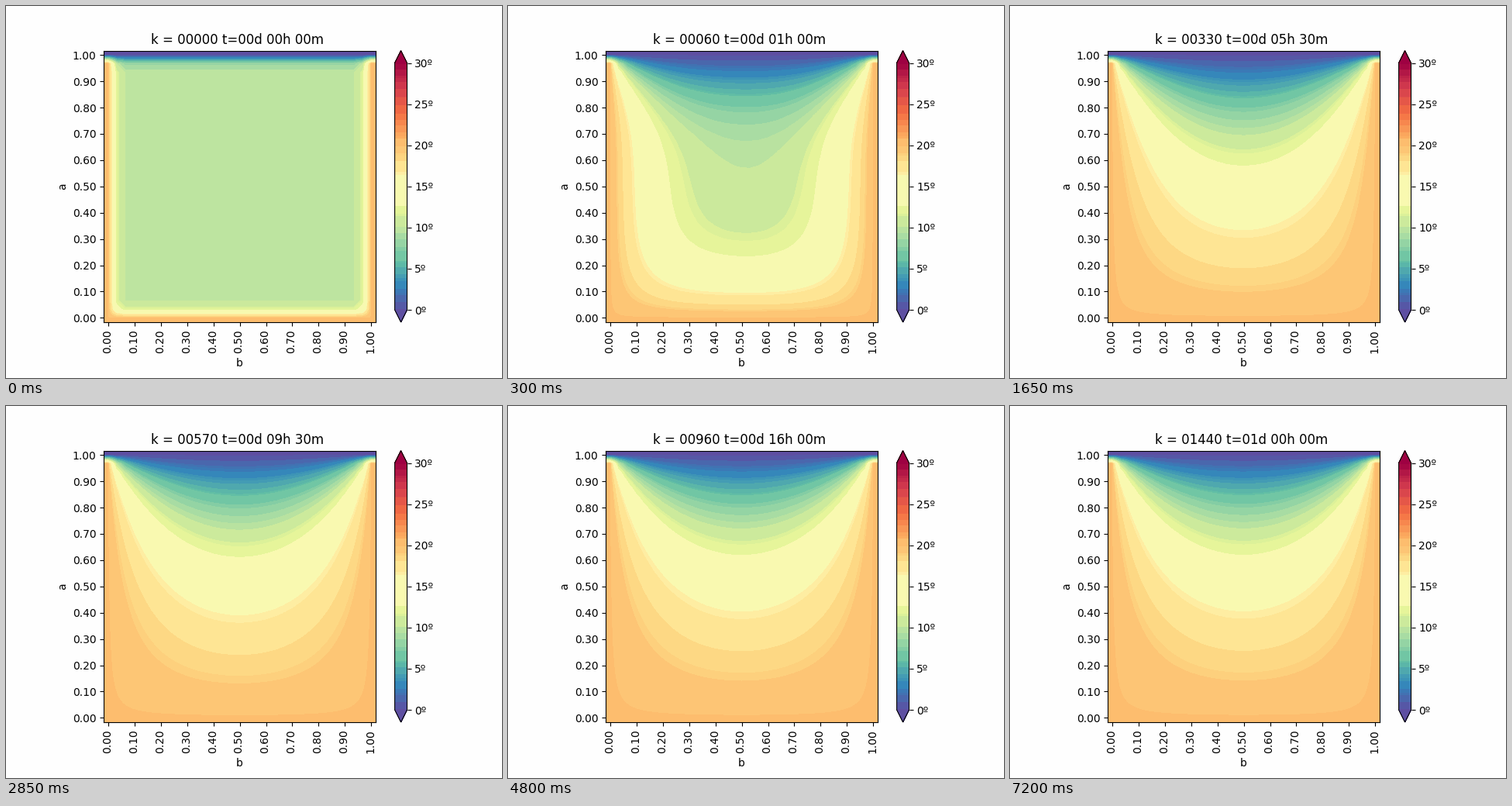
Animation of 640x480 px, one loop 7.35 s. Source, as a matplotlib script:

```python
import matplotlib.pyplot as plt
import numpy as np
from matplotlib.animation import FuncAnimation
from matplotlib.colors import ListedColormap
from matplotlib.transforms import ScaledTranslation

N = 31            # nodes per side
RATE = 0.184      # diffusion number per one-minute step
STRIDE = 30       # minutes between pictures
FRAMES = 49
VMAX = 30
SPECTRAL = (plt.get_cmap("Spectral_r")(np.arange(256))[:, :3] * 255).astype(int)


def sweep(new, old):
    """Diffuse the inner nodes; in place when both grids are the same."""
    for i in range(1, N - 1):
        below, row, above = old[i - 1], old[i], old[i + 1]
        for j in range(1, N - 1):
            near = below[j] + above[j] + row[j - 1] + row[j + 1]
            new[i][j] = row[j] + RATE * (near - 4 * row[j])


def simulate():
    start = [[20.0] + [10.0] * (N - 2) + [20.0] for _ in range(N)]
    start[0] = [20.0] * N
    start[-1] = [0.0] * N
    u = [row[:] for row in start]
    sweep(u, start)
    fields = [np.array(u)]
    while len(fields) < FRAMES:
        for _ in range(STRIDE):
            sweep(u, u)
        fields.append(np.array(u))
    return fields


# Bilinear weights from nodes to screen pixels
pix = (np.arange(350) + 0.5) / 350 * N - 0.5
WEIGHTS = np.array([np.interp(pix, np.arange(N), e) for e in np.eye(N)]).T


def banded(field):
    """Merge the colour map into coarse RGB cells, averaged by screen area."""
    level = (WEIGHTS @ field @ WEIGHTS.T / VMAX * 256).astype(int).clip(0, 255)
    area = np.bincount(level.ravel(), minlength=256) + 20.0
    _, cell = np.unique(SPECTRAL // [32, 16, 32], axis=0, return_inverse=True)
    cell = cell.ravel()
    total = np.bincount(cell, area)
    mean = [np.bincount(cell, area * SPECTRAL[:, c]) / total for c in range(3)]
    return ListedColormap(np.floor(np.array(mean).T[cell]) / 255)


fields = simulate()
cmaps = [banded(f) for f in fields]

fig, ax = plt.subplots(figsize=(6.4, 4.8), dpi=100, facecolor="#fefefe")
fig.subplots_adjust(bottom=0.15)
im = ax.imshow(fields[0], cmap=cmaps[0], vmin=0, vmax=VMAX, origin="lower",
               interpolation="bilinear")
fig.colorbar(im, ax=ax, extend="both", aspect=22,
             ticks=range(0, VMAX + 1, 5), format="%dº")

ticks = np.arange(0, N, 3)
labels = [f"{t / (N - 1):.2f}" for t in ticks]
ax.set_xticks(ticks, labels, rotation=90)
ax.set_yticks(ticks, labels)
nudge = ScaledTranslation(-1 / fig.dpi, 0, fig.dpi_scale_trans)
for label in ax.get_xticklabels():
    label.set_transform(label.get_transform() + nudge)
ax.set_xlabel("b")
ax.set_ylabel("a")
title = ax.set_title("", x=0.4925)


def draw(n):
    k = n * STRIDE
    days, rest = divmod(k, 1440)
    title.set_text(f"k = {k:05d} t={days:02d}d {rest // 60:02d}h {rest % 60:02d}m")
    im.set_data(fields[n])
    im.set_cmap(cmaps[n])
    return im, title


anim = FuncAnimation(fig, draw, frames=FRAMES, interval=150, repeat=True)
plt.show()
```
